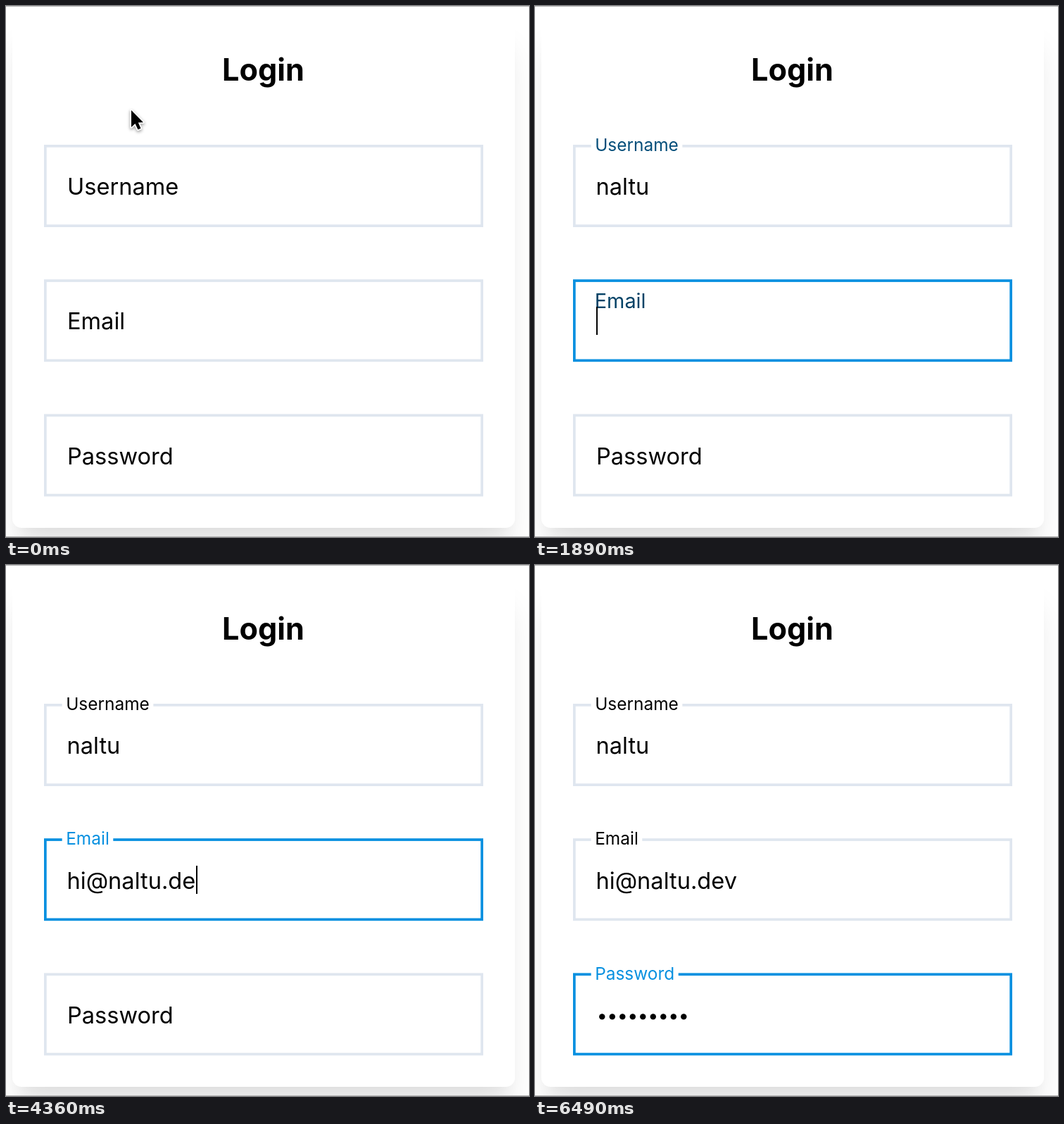
Write an HTML page with a canvas that moves like this. It is 743 by 754 pixels and loops after 6.52 s.

```html
<!DOCTYPE html>
<html lang="en">
<head>
<meta charset="utf-8">
<title>Login</title>
<style>
  html, body { margin: 0; width: 100%; height: 100%; overflow: hidden; background: #fff; }
  #stage { position: relative; width: 743px; height: 754px; overflow: hidden; }
  #card {
    position: absolute; left: 9px; top: 17px; width: 714px; height: 724px;
    border-radius: 13px; background: #fff;
    box-shadow: 0 36px 46px -9px rgba(0, 0, 0, .1), 0 18px 18px -9px rgba(0, 0, 0, .04);
  }
  canvas { position: absolute; left: 0; top: 0; }
</style>
</head>
<body>
<div id="stage">
  <div id="card"></div>
  <canvas id="view" width="743" height="754"></canvas>
</div>
<script>
const ctx = document.getElementById('view').getContext('2d');
const LOOP = 6520;
const EASE_MS = 300;
const UNIT = 1.83;
const FONT_SIZE = 32.6;
const FACE = 'Inter, "Open Sans", sans-serif';
const BLUE = [7, 144, 224];
const GREY = '#dfe6ef';
const LEFT = 54, WIDTH = 624, HEIGHT = 117, LINE = 3.7;
const TEXT_X = 87, BASELINE = 71.3;

const fields = [
  { label: 'Username', y: 197, focus: 620, blur: 1790,
    value: 'naltu', keys: [930, 1110, 1270, 1430, 1580] },
  { label: 'Email', y: 388.2, focus: 1790, blur: 4630,
    value: 'hi@naltu.dev',
    keys: [2700, 2820, 2950, 3080, 3250, 3400, 3550, 3700, 3840, 4030, 4150, 4365] },
  { label: 'Password', y: 579.4, focus: 4630, blur: Infinity, secret: true,
    value: '•'.repeat(9),
    keys: [5060, 5190, 5320, 5450, 5590, 5720, 5860, 6000, 6140] }
];

const clamp = v => Math.min(1, Math.max(0, v));
const mix = (a, b, p) => a + (b - a) * p;
const ramp = (t, from, to) => clamp((t - from) / (to - from));

// cubic-bezier(.4, 0, .2, 1)
function ease(x) {
  let lo = 0, hi = 1, u = x;
  for (let i = 0; i < 20; i++) {
    u = (lo + hi) / 2;
    const bx = 1.2 * u * (1 - u) ** 2 + 0.6 * u * u * (1 - u) + u ** 3;
    if (bx < x) lo = u; else hi = u;
  }
  return 3 * u * u * (1 - u) + u ** 3;
}

const progress = (t, start) => t <= start ? 0 : ease(clamp((t - start) / EASE_MS));
const rgb = k => `rgb(${BLUE.map(c => Math.round(c * k)).join(',')})`;

function text(str, x, y, size, color = '#000', weight = 400) {
  ctx.font = `${weight} ${size}px ${FACE}`;
  ctx.fillStyle = color;
  ctx.fillText(str, x, y);
}

function textWidth(str) {
  ctx.font = `400 ${FONT_SIZE}px ${FACE}`;
  return ctx.measureText(str).width;
}

function caretAlpha(t) {
  if (t >= 930 && t < 1050) return 0;
  if (t >= 2290 && t < 2690) return 1 - ramp(t, 2290, 2400) + ramp(t, 2560, 2660);
  return 1 - ramp(t, 6360, 6485);
}

function drawLabel(f, t) {
  const p = progress(t, f.focus);
  const tint = p * (1 - progress(t, f.blur));
  const scale = 1 - 0.25 * p;
  const padX = mix(16, 4, p) * UNIT;
  const padY = mix(16, 0, p) * UNIT;
  const x = LEFT + LINE + 12 * UNIT * p;
  const y = f.y + LINE - 23.2 * p;
  const lineHeight = 28 * UNIT;
  ctx.save();
  ctx.translate(x, y);
  ctx.scale(scale, scale);
  if (p >= 0.5) {
    ctx.fillStyle = '#fff';
    ctx.fillRect(0, 0, textWidth(f.label) + 2 * padX, lineHeight + 2 * padY);
  }
  text(f.label, padX, padY + 38.2, FONT_SIZE, rgb(tint));
  ctx.restore();
}

function drawInput(f, t) {
  const focused = t >= f.focus && t < f.blur;
  const typed = f.value.slice(0, f.keys.filter(k => t >= k).length);
  ctx.strokeStyle = focused ? rgb(1) : GREY;
  ctx.lineWidth = LINE;
  ctx.strokeRect(LEFT + LINE / 2, f.y + LINE / 2, WIDTH - LINE, HEIGHT - LINE);

  let end = TEXT_X;
  if (f.secret) {
    ctx.fillStyle = '#000';
    for (let i = 0; i < typed.length; i++) {
      ctx.beginPath();
      ctx.arc(95.3 + 14.5 * i, f.y + 62, 4.2, 0, 2 * Math.PI);
      ctx.fill();
    }
    end += 14.7 * typed.length;
  } else {
    text(typed, TEXT_X - 0.5, f.y + BASELINE, FONT_SIZE);
    end += textWidth(typed);
  }

  if (focused) {
    ctx.globalAlpha = caretAlpha(t);
    ctx.fillStyle = '#000';
    ctx.fillRect(Math.round(end), Math.round(f.y + 39), 2, 40);
    ctx.globalAlpha = 1;
  }
}

function drawField(f, t) {
  const layers = [drawLabel, drawInput];
  // The label rises above the input halfway through its move.
  if (progress(t, f.focus) >= 0.5) layers.reverse();
  layers.forEach(draw => draw(f, t));
}

function drawArrow(x, y) {
  const points = [[0, 0], [0, 24], [5.5, 19], [9.5, 27.5], [13.5, 25.7], [9.8, 17.5], [17, 17.2]];
  ctx.save();
  ctx.translate(x, y);
  ctx.beginPath();
  points.forEach(([px, py]) => ctx.lineTo(px, py));
  ctx.closePath();
  ctx.shadowColor = 'rgba(0, 0, 0, .4)';
  ctx.shadowBlur = 4;
  ctx.shadowOffsetY = 2;
  ctx.lineWidth = 3.5;
  ctx.lineJoin = 'round';
  ctx.strokeStyle = '#fff';
  ctx.stroke();
  ctx.shadowColor = 'transparent';
  ctx.fillStyle = '#000';
  ctx.fill();
  ctx.restore();
}

function drawBeam(x, y) {
  ctx.strokeStyle = '#222';
  ctx.lineWidth = 2;
  ctx.beginPath();
  ctx.moveTo(x - 5, y - 15);
  ctx.quadraticCurveTo(x, y - 15, x, y - 11);
  ctx.lineTo(x, y + 11);
  ctx.quadraticCurveTo(x, y + 15, x - 5, y + 15);
  ctx.moveTo(x + 5, y - 15);
  ctx.quadraticCurveTo(x, y - 15, x, y - 11);
  ctx.moveTo(x, y + 11);
  ctx.quadraticCurveTo(x, y + 15, x + 5, y + 15);
  ctx.stroke();
}

function drawPointer(t) {
  if (t >= fields[0].keys[0]) return;
  const p = ease(ramp(t, 20, 560));
  const x = mix(178, 205, p), y = mix(148, 257, p);
  (y < fields[0].y ? drawArrow : drawBeam)(x, y);
}

function render(t) {
  ctx.clearRect(0, 0, 743, 754);
  ctx.fillStyle = '#b4b4b4';
  ctx.fillRect(0, 0, 743, 1);
  ctx.fillRect(0, 753, 743, 1);
  ctx.textAlign = 'center';
  text('Login', 365.5, 106, 43.2, '#000', 700);
  ctx.textAlign = 'left';
  fields.forEach(f => drawField(f, t));
  drawPointer(t);
}

let start;
function tick(now) {
  start ??= now;
  render((now - start) % LOOP);
  requestAnimationFrame(tick);
}
render(0);
requestAnimationFrame(tick);
</script>
</body>
</html>
```
